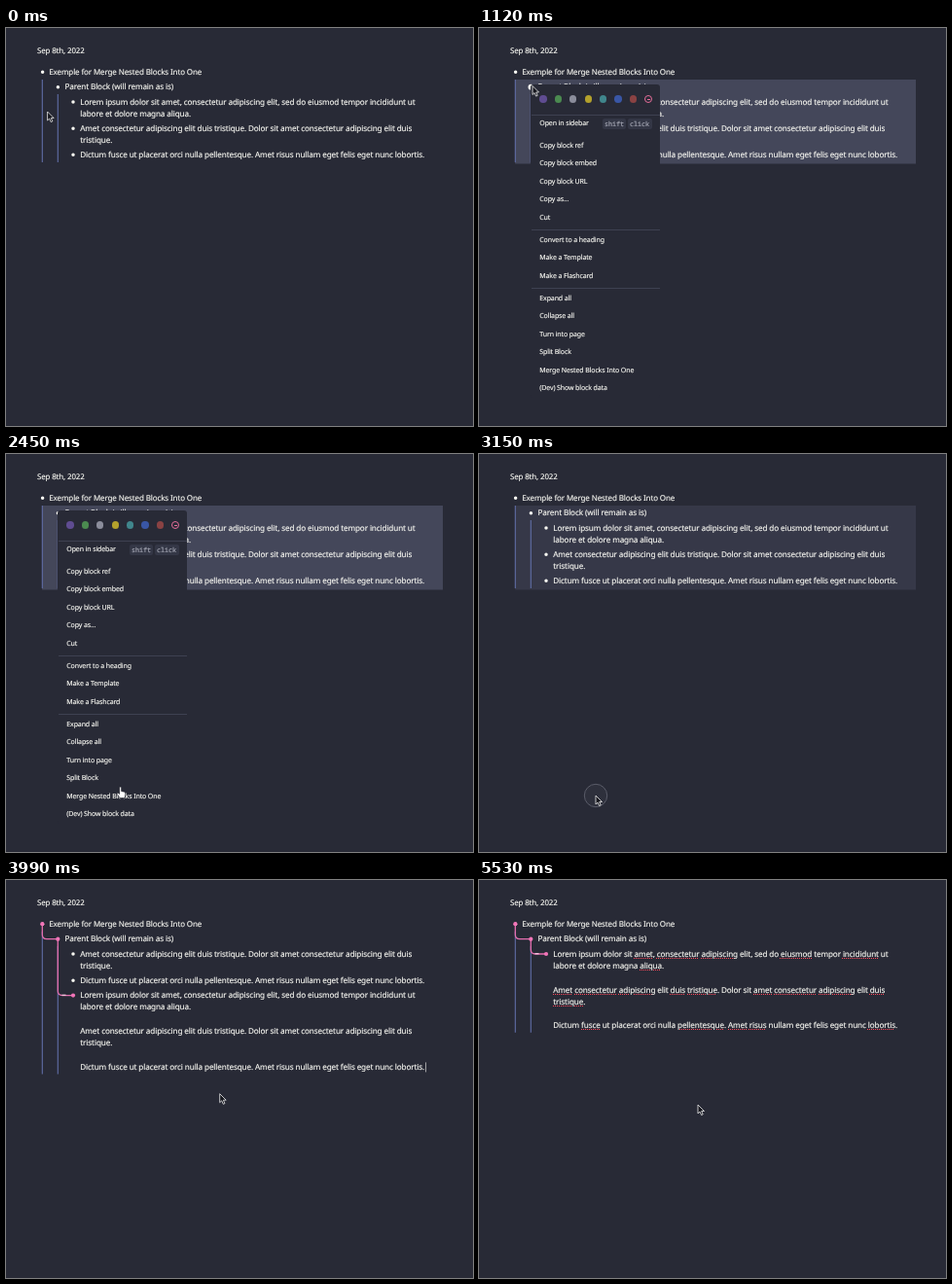
Write an HTML page that moves like this. It is 480 by 409 pixels and loops after 5.6 s.

```html
<!DOCTYPE html>
<html lang="en">
<head>
<meta charset="utf-8">
<title>Merge nested blocks</title>
<style>
  html, body { margin: 0; width: 100%; height: 100%; overflow: hidden; background: #282a36; }
  #stage { position: relative; width: 480px; height: 409px; overflow: hidden; color: #f8f8f2;
    font: 8.15px/12px "Noto Sans", "Open Sans", sans-serif; letter-spacing: -.12px;
    -webkit-text-stroke: .15px; text-rendering: geometricPrecision; }
  #stage div, svg { position: absolute; white-space: pre; }
  svg { left: 0; top: 0; width: 480px; height: 409px; }
  #menu { left: 53px; top: 58px; width: 133px; height: 322px; background: #282a36;
    border-radius: 3px; font-size: 7px; }
  #menu .rule { left: 1px; width: 132px; height: 1px; background: #3e4151; }
  #menu .key { height: 11px; border-radius: 2px; background: #343746; color: #a9abb8; text-align: center;
    font: 6.7px/11px "Noto Sans Mono", monospace; letter-spacing: 0; }
  .swatch { border-radius: 50%; }
  u { text-decoration: none; }
  .spell u { text-decoration: underline dotted #ff4658 1.2px; text-underline-offset: 1px; }
</style>
</head>
<body>
<div id="stage">
  <svg fill="none">
    <rect id="glow" x="37" y="53" width="412" height="86.5" fill="#44475a"/>
    <path id="guides" stroke="#606ea6" stroke-width="1.1"/>
    <path id="bullets" stroke="#f8f8f2" stroke-width="3.5" stroke-linecap="round"/>
    <circle id="hover" cx="53.4" cy="60.7" r="2.9" fill="#f8f8f2"/>
  </svg>
  <div id="text"></div>
  <svg id="trail" fill="#f274b8">
    <path id="thread" fill="none" stroke="#e56fb0" stroke-width="1.3"/>
    <circle cx="37.3" cy="45.2" r="2.1"/>
    <circle cx="53.3" cy="60.7" r="2.1"/>
    <circle id="tip" cx="69" r="2.1"/>
    <path id="fold" stroke="#f6c5de" stroke-width="1.3"/>
    <rect id="caret" x="431" width=".7" height="10" fill="#d8d8d6"/>
  </svg>
  <div id="menu"></div>
  <svg>
    <circle id="ring" cx="120" cy="351" r="11.7" fill="#fff" fill-opacity=".03" stroke="#5a5c69"/>
    <g id="cursor">
      <path id="arrow" d="M0 0V9L2 7.1 3.6 10.6 5.2 9.9 3.7 6.5H6.5Z" fill="#16171e" stroke="#eee" stroke-width=".8"/>
      <path id="hand" d="M-1 0q1-1 2 0V4l3 .6q1.3.4 1.2 2L4.5 11H-.7L-3.4 7q-.5-1.6 1.2-1L-1 6.8Z"
        fill="#fff" stroke="#20222b" stroke-width=".7"/>
    </g>
  </svg>
</div>
<script>
const $ = id => document.getElementById(id);
const show = (node, on) => { node.style.display = on ? "" : "none"; };
const set = (node, attrs) => { for (const k in attrs) node.setAttribute(k, attrs[k]); };

function add(parent, style, html = "", cls = "") {
  const node = document.createElement("div");
  for (const k in style) node.style[k] = typeof style[k] === "number" ? style[k] + "px" : style[k];
  node.innerHTML = html;
  node.className = cls;
  return parent.appendChild(node);
}
// y is the middle of the line
const line = (parent, x, y, html, style) => add(parent, { left: x, top: y - 5.4, ...style }, html);

const LINE = 12.3, FIRST = 76;
const text = $("text"), menu = $("menu");

line(text, 32, 23.5, "Sep 8th, 2022", { fontSize: 7.9 });
line(text, 44.3, 45, "Exemple for Merge Nested Blocks Into One", { fontSize: 8 });
line(text, 60.5, 60.5, "Parent Block (will remain as is)");

const paragraphs = [
  ["Lorem ipsum dolor sit <u>amet</u>, <u>consectetur</u> <u>adipiscing</u> elit, sed do <u>eiusmod</u> tempor <u>incididunt</u> ut",
   "labore et dolore magna <u>aliqua</u>."],
  ["<u>Amet</u> <u>consectetur</u> <u>adipiscing</u> elit <u>duis</u> <u>tristique</u>. Dolor sit <u>amet</u> <u>consectetur</u> <u>adipiscing</u> elit <u>duis</u>",
   "<u>tristique</u>."],
  ["Dictum <u>fusce</u> ut placerat orci nulla <u>pellentesque</u>. <u>Amet</u> <u>risus</u> nullam eget felis eget nunc <u>lobortis</u>."]
];
const blocks = paragraphs.map(rows => {
  const node = add(text, { left: 0, top: 0 });
  rows.forEach((row, i) => line(node, 76.3, i * LINE, row));
  return { node, height: 11.6 * rows.length + 3.9 };
});
const merged = add(text, { left: 0, top: 0 });
const mergedLines = paragraphs.flatMap((rows, p) =>
  rows.map((row, i) => line(merged, 76.3, (p * 3 + i) * LINE, row)));

["#5f4c91", "#4b8a50", "#8b8d9b", "#b3a12c", "#40868c", "#3956a5", "#8a4243"].forEach((background, i) =>
  add(menu, { left: 9.3 + i * 15.4, top: 11.3, width: 7.4, height: 7.4, background }, "", "swatch"));
add(menu, { left: 117, top: 11, width: 6.2, height: 6.2, border: "1px solid #e66d99" }, "", "swatch");
add(menu, { left: 119.5, top: 14.6, width: 3, height: 1, background: "#e66d99" });
[89, 207, 267].forEach(y => add(menu, { top: y - 58 }, "", "rule"));
add(menu, { left: 74, top: 35, width: 24 }, "shift", "key");
add(menu, { left: 99.5, top: 35, width: 25 }, "click", "key");
[[98, "Open in sidebar"],
 [121, "Copy block ref", "Copy block embed", "Copy block URL", "Copy as...", "Cut"],
 [218, "Convert to a heading", "Make a Template", "Make a Flashcard"],
 [278, "Expand all", "Collapse all", "Turn into page", "Split Block", "Merge Nested Blocks Into One", "(Dev) Show block data"]
].forEach(([y, ...items]) => items.forEach((item, i) => line(menu, 9.3, y - 58 + i * 18.5, item)));

const path = [
  [0, 42.6, 86], [350, 42.6, 86], [980, 55, 59.5], [1260, 55, 59.5], [1820, 93, 254],
  [2590, 120, 351], [3150, 120, 351], [3710, 219.7, 219.7], [5180, 219.7, 219.7], [5530, 225, 231], [5600, 225, 231]
];
function cursorAt(t) {
  const i = path.findIndex(k => k[0] > t);
  const [t0, x0, y0] = path[i - 1], [t1, x1, y1] = path[i];
  const p = (t - t0) / (t1 - t0), e = p * p * (3 - 2 * p);
  return [x0 + (x1 - x0) * e, y0 + (y1 - y0) * e];
}

const removal = [3920, 4060, 4200];

function draw(t) {
  const within = (a, b) => t >= a && t < b;
  const editing = t >= 3500;

  let y = FIRST, dots = "M37.6 45.2h0M53.4 60.7h0";
  blocks.forEach(({ node, height }, i) => {
    const alive = t < removal[i];
    show(node, alive);
    node.style.top = y + "px";
    if (!alive) return;
    dots += `M69 ${y + .1}h0`;
    y += height;
  });
  set($("bullets"), { d: dots });
  show(merged, editing);
  merged.style.top = y + "px";
  mergedLines.forEach((row, i) =>
    row.className = t >= (i === mergedLines.length - 1 ? 4830 : 5250) ? "spell" : "");

  const end = editing ? y + 6 * LINE + 7 : 138;
  set($("guides"), { d: `M37.3 53V${end}M53.3 68V${end}` });
  set($("thread"), { d: `M37.3 45V56Q37.3 60.7 41.8 60.7H53.3V${y - 4.5}Q53.3 ${y} 57.8 ${y}H69` });
  set($("fold"), { d: `M57.5 ${y - .3}h4` });
  set($("tip"), { cy: y });
  set($("caret"), { y: y + 6 * LINE - 5 });
  show($("trail"), editing);
  show($("caret"), within(3500, 4410) || within(4900, 5390));

  show($("hover"), within(910, 1330));
  show(menu, within(1050, 3080));
  $("glow").style.opacity = t < 1050 ? 0 : Math.min(1, Math.max(0, 1 - (t - 3080) / 140));
  show($("ring"), within(2940, 3220));

  const hand = within(1330, 3080);
  show($("hand"), hand);
  show($("arrow"), !hand);
  set($("cursor"), { transform: `translate(${cursorAt(t)})` });
}

const STEP = 70, LOOP = 5600, start = performance.now();
function tick() {
  draw(Math.floor((performance.now() - start) % LOOP / STEP) * STEP);
  requestAnimationFrame(tick);
}
tick();
</script>
</body>
</html>
```
